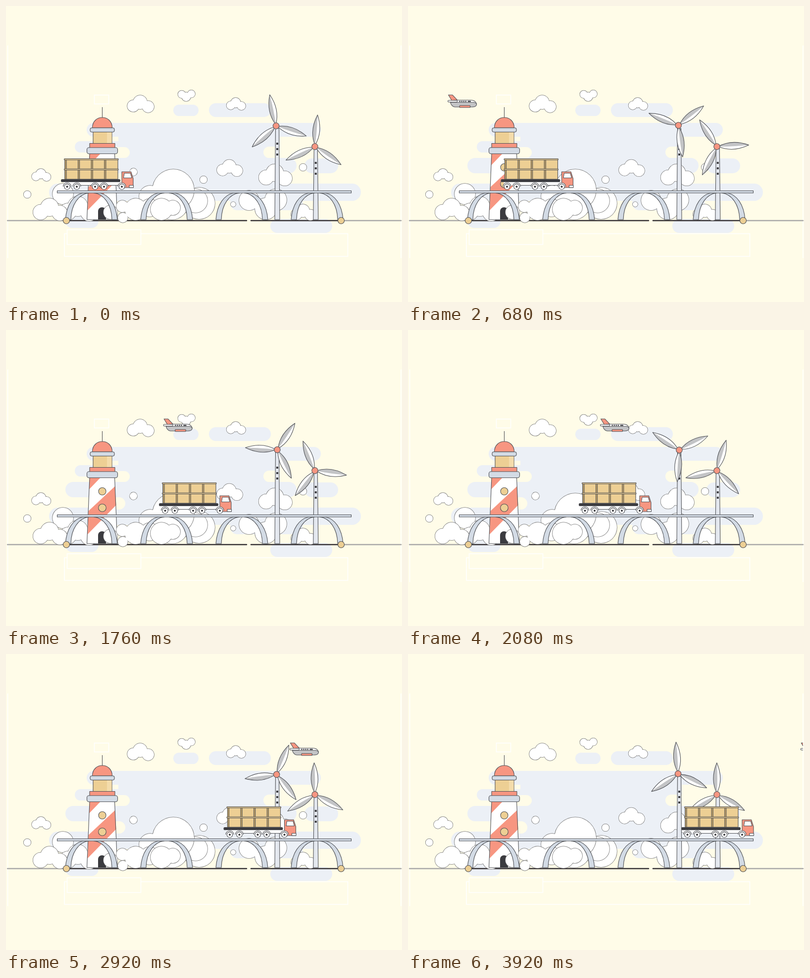
Write an HTML page that moves like this. It is 800 by 600 pixels and loops after 3.96 s.

```html
<!DOCTYPE html>
<html lang="en">
<head>
<meta charset="utf-8">
<title>Bridge and wind turbines</title>
<style>
  html, body { margin: 0; width: 100%; height: 100%; overflow: hidden; background: #fffce8; }
  svg { display: block; width: 800px; height: 600px; }
  .ink { stroke: #505257; stroke-width: 1.1; stroke-linejoin: round; }
  .edge { stroke: #707070; stroke-width: 1.5; }
  .line { fill: none; }
  .blob { fill: #ecf0f6; }
  .bg { fill: #fffce8; }
  .white { fill: #fff; }
  .steel { fill: #d3dbe5; }
  .pale { fill: #e4e8ef; }
  .red { fill: #f79681; }
  .sand { fill: #edcf94; }
  .light { fill: #f4dcab; }
  .tan { fill: #c9a766; }
  .dark { fill: #3b3b3f; }
  .grey { fill: #c3c4c6; }
  .faint { fill: none; stroke: #fff; stroke-width: 1.5; }
  .ground { stroke-width: 2.5; stroke-linecap: round; }
</style>
</head>
<body>
<svg id="stage" viewBox="0 0 800 600"></svg>
<script>
const LOOP = 3960, STEP = 40;

const rect = (x, y, w, h, cls, r = 0) =>
  `<rect x="${x}" y="${y}" width="${w}" height="${h}" rx="${r}" class="${cls}"/>`;
const bar = (x1, x2, y, h = 28, cls = 'blob') => rect(x1, y, x2 - x1, h, cls, h / 2);
const disc = (x, y, r, cls) => `<circle cx="${x}" cy="${y}" r="${r}" class="${cls}"/>`;
const path = (d, cls) => `<path d="${d}" class="${cls}"/>`;
const group = (transform, body, id = '') => `<g id="${id}" transform="${transform}">${body}</g>`;
const repeat = (n, draw) => Array.from({ length: n }, (_, i) => draw(i)).join('');

// Circles merged into one white shape with a single outline.
const cloud = (...lobes) =>
  lobes.map(c => disc(...c, 'white edge')).join('') + lobes.map(c => disc(...c, 'white')).join('');
// Three-lobed cloud around its largest circle; flip = -1 turns it upside down.
const puff = (x, y, r, flip = 1) => cloud(
  [x - r, y + flip * r * 0.55, r * 0.85], [x, y, r], [x + r * 1.15, y + flip * r * 0.65, r * 0.85]);

const backdrop = () =>
  rect(227, 237, 326, 158, 'blob') +
  bar(163, 636, 237) + bar(139, 260, 274, 23) + bar(120, 587, 308, 31) + bar(603, 671, 309, 30) +
  bar(87, 717, 360, 35) + bar(453, 600, 386) +
  bar(338, 389, 200, 23) + bar(410, 535, 197) + bar(534, 659, 432) + bar(120, 187, 422) +
  bar(170, 250, 286, 22, 'bg') + bar(170, 241, 339, 25, 'bg') + bar(520, 590, 285, 23, 'bg') +
  path('M178.5 180.5h29v18h-29zM123.5 453.5h149v30h-149zM273 461.5H690.5V507.5H118V461.5h5M3.5 80V511M798 80V511', 'faint');

const ground = () =>
  '<path d="M3 435H122M677 435H798" class="ground" stroke="#aaa9a8"/>' +
  '<path d="M128 435H486M495 435H672" class="ground" stroke="#383437"/>';

const clouds = () =>
  puff(271, 195, 14) + puff(364, 184, 9, -1) + puff(464, 196, 10) +
  puff(451, 325, 13.5) + puff(70.5, 340, 10) + puff(543, 338, 17.5) +
  cloud([43, 382, 7.3]) + cloud([257.5, 336.5, 7.5]) + cloud([399, 352, 7.3]) +
  cloud([600, 327, 7.3]) + cloud([459, 402, 5]) +
  cloud([115, 381, 21]) + puff(145, 406, 20) + puff(88, 408, 18) +
  cloud([390, 400, 32]) + cloud([383, 395, 24]) +
  cloud([338, 373, 42], [291, 386, 22], [335, 400, 33]) +
  cloud([491, 394, 20], [525, 411, 22], [545, 393, 22]) +
  puff(600, 415, 13);

const frontClouds = () =>
  cloud([211, 418, 14], [235, 406, 12], [236, 429, 10], [262, 412, 22], [290, 409, 18]) +
  cloud([314, 412, 22], [337, 409, 15]);

const lighthouse = () => {
  const body = 'M169 299H219.5L225 433H163.5Z';
  return path('M194.5 205V227', 'ink') + path(body, 'white') +
    path('M169 299H191L168 323ZM220 317L222.5 355L165 414L166.5 367Z', 'red') +
    path(body, 'line ink') +
    disc(194.5, 327, 7.5, 'sand ink') + disc(194.5, 360.5, 7.8, 'sand ink') +
    path('M186 433V416a8 8 0 0 1 16 0V433Z', 'dark') +
    rect(176, 254, 38, 25, 'sand ink') + rect(204, 255, 9.5, 23.5, 'light') +
    path('M174.5 247C174.5 219 214.5 219 214.5 247Z', 'red ink') +
    rect(169, 278.5, 51, 9, 'red ink') +
    rect(170, 247, 49, 8.5, 'steel ink', 3.5) + rect(163.5, 287, 62, 12.5, 'steel ink', 4);
};

const tower = (x, top) =>
  path(`M${x - 3.5} ${top}h7L${x + 5} 433h-10Z`, 'pale ink') +
  repeat(3, i => rect(x - 2, top + 29 + i * 11, 4, 4, 'dark'));

const blade = angle => {
  const outline = 'M0-3Q-14-31 0-64.5Q14-31 0-3Z';
  return group(`rotate(${angle})`,
    path(outline, 'white') + path('M0-3Q-14-31 0-64.5Q2-31 0-3Z', 'grey') + path(outline, 'line ink'));
};
const rotor = (id, pose) => group('',
  group(pose, repeat(3, i => blade(i * 120)) + disc(0, 0, 6.2, 'red ink')), id);

const archLeg = (x, side) => group(`translate(${x}) scale(${side} 1)`,
  path('M-52.5 433C-50 402-36 383-17 379H-5C-25 381-41 402-41.5 433Z', 'steel ink'));
const bridge = () =>
  repeat(4, i => archLeg(172.5 + i * 152, 1) + archLeg(172.5 + i * 152, -1)) +
  rect(103.5, 374.5, 594, 4.5, 'steel ink') +
  disc(122, 435, 6.5, 'sand ink') + disc(677, 435, 6.5, 'sand ink');

const crates = () => {
  const row = y => rect(119, y, 107, 20.5, 'sand ink');
  const rail = y => rect(117.5, y, 109.5, 2.5, 'sand ink', 1);
  return row(310) + row(330.5) +
    repeat(4, i => rect(119 + i * 26.6, 311, 3, 40, 'tan ink')) + rail(309.5) + rail(330);
};
const wheel = x => path(`M${x - 8} 366a8 8 0 0 1 16 0`, 'white ink') +
  disc(x, 366.3, 5.7, 'white ink') + disc(x, 366.3, 2, 'dark');
const truck = () => crates() +
  rect(117, 356, 117, 8, 'white') + path('M151 363.5H172M206 363.5H226', 'ink') +
  rect(111.5, 351.5, 119, 5, 'dark ink', 2) +
  path('M234 336H252.5L257 350V368H234Z', 'red ink') +
  path('M237.5 348.5L239 339H251.5L254 348.5Z', 'white ink') +
  [123.5, 143, 180, 198, 234].map(wheel).join('') +
  rect(249, 363.5, 8.5, 4.5, 'white ink');

const plane = () =>
  path('M1 .5H9L20 12H8Z', 'red ink') +
  path('M7 13Q10 11 18 11H46Q56 11 58 19H10Q5 19 7 13Z', 'white ink') +
  path('M5 15.5H51Q58 16 58 20Q57 25 50 25H14Q7 24 5 15.5Z', 'grey ink') +
  rect(0, 11.5, 19, 3.5, 'white ink', 1.7) + rect(23.5, 22, 21.5, 4, 'red ink', 1) +
  repeat(4, i => rect(23 + i * 4, 12.5, 2.3, 2.3, 'dark')) + rect(40, 12.5, 6.5, 2.3, 'dark', 1);

document.getElementById('stage').innerHTML =
  '<clipPath id="frame"><rect width="798" height="600"/></clipPath>' +
  backdrop() + ground() + clouds() + lighthouse() + frontClouds() +
  tower(548, 248) + tower(625.8, 287) +
  // The first hub sits slightly off its axis.
  rotor('rotorA', 'translate(-1.2 0) rotate(-11.4)') + rotor('rotorB', 'rotate(4.8)') +
  bridge() + group('', truck(), 'truck') +
  `<g clip-path="url(#frame)">${group('', plane(), 'plane')}</g>`;

const place = (id, value) => document.getElementById(id).setAttribute('transform', value);
const start = performance.now();

function draw(now) {
  const t = Math.floor(Math.max(0, now - start) % LOOP / STEP) * STEP;
  place('rotorA', `translate(546.8 243) rotate(${t * 0.0938})`);
  place('rotorB', `translate(624 285) rotate(${t * 0.1212})`);
  place('truck', `translate(${t * 0.1125})`);
  place('plane', `translate(${t * 0.22 - 69} 179.7)`);
  requestAnimationFrame(draw);
}
draw(start);
</script>
</body>
</html>
```
